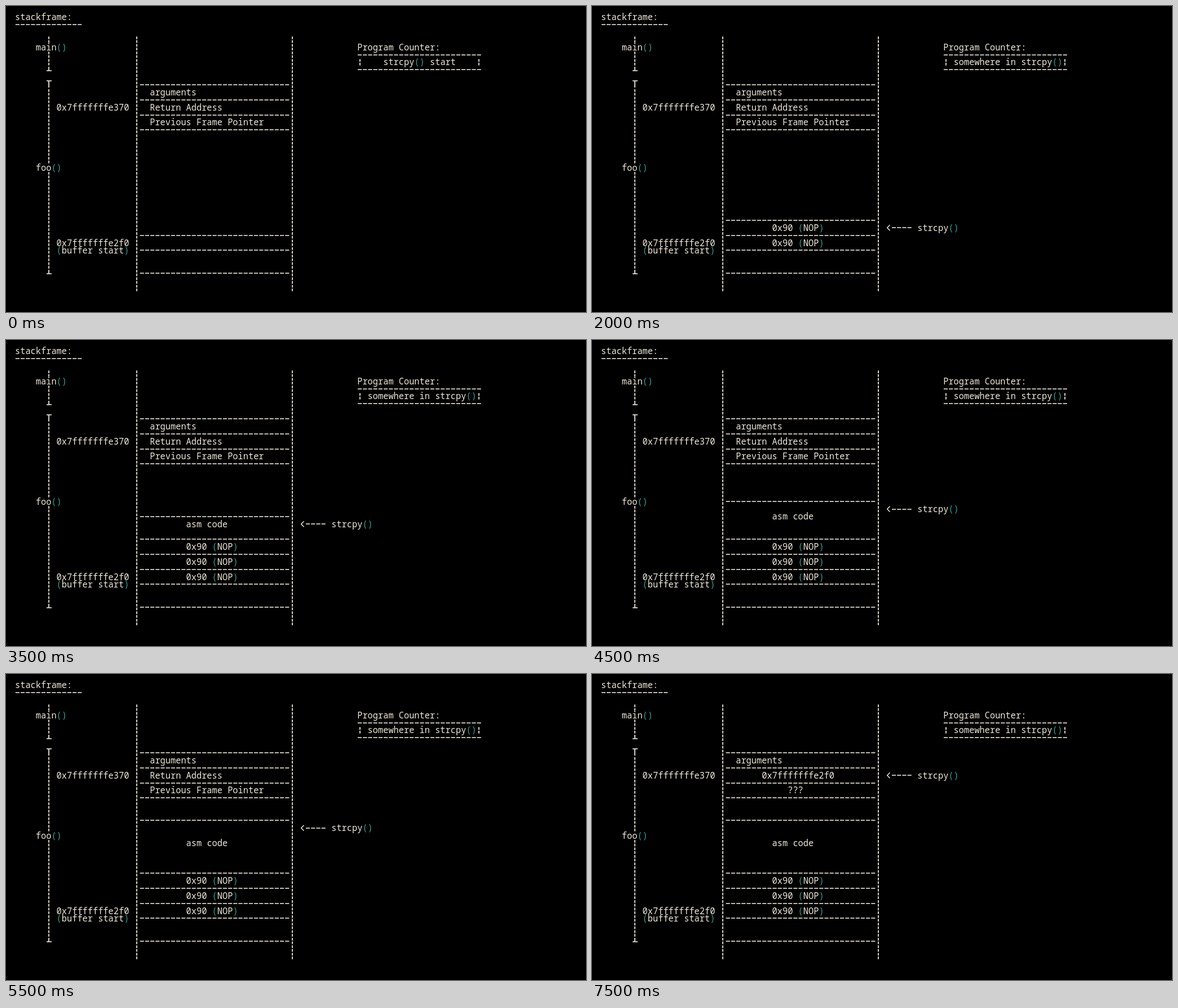
An HTML page with a canvas that plays this animation: 1029x544 px, repeating every 8 s.

```html
<!DOCTYPE html>
<html lang="en">
<head>
<meta charset="utf-8">
<title>Stack frame</title>
<style>
  html, body { margin: 0; width: 100%; height: 100%; overflow: hidden; background: #000; }
  canvas { display: block; width: 1029px; height: 544px; }
</style>
</head>
<body>
<canvas id="stage" width="1029" height="544"></canvas>
<script>
const ctx = document.getElementById('stage').getContext('2d');
const LOOP = 8000, FIRST_STEP = 1500, STEP = 500;
const CELL = 9.2, PITCH = 13.38, LEFT = 16, TOP = 19.6;
const INK = '#eee8d5', TEAL = '#2aa198';

const colX = col => LEFT + col * CELL;
const rowY = row => TOP + row * PITCH;

function text(col, row, str) {
  for (const part of str.split(/([()])/)) {
    ctx.fillStyle = /[()]/.test(part) ? TEAL : INK;
    ctx.fillText(part, colX(col), rowY(row) + 5.5);
    col += part.length;
  }
}

function dashes(col, row, count) {
  ctx.fillStyle = INK;
  for (let i = 0; i < count; i++) {
    ctx.fillRect(colX(col + i) + 0.8, Math.round(rowY(row)) - 0.8, 7.2, 1.6);
  }
}

function bars(col, from, to) {
  ctx.fillStyle = INK;
  const x = Math.round(colX(col) + 4.6) - 0.9;
  for (let row = from; row <= to; row++) {
    ctx.fillRect(x, rowY(row) - 5.5, 1.8, 4.8);
    ctx.fillRect(x, rowY(row) + 1, 1.8, 4.8);
  }
}

// Bracket end: a short horizontal stroke with a stem leading to the line.
function cap(y, stem) {
  ctx.fillStyle = INK;
  ctx.fillRect(72, y - 0.8, 9, 1.6);
  ctx.fillRect(75.1, Math.min(y, y + stem), 1.8, Math.abs(stem));
}

const rule = row => dashes(24, row, 29);

function arrow(row) {
  const x = colX(55), y = rowY(row);
  ctx.strokeStyle = INK;
  ctx.lineWidth = 1.5;
  ctx.beginPath();
  ctx.moveTo(x + 6.5, y - 5);
  ctx.lineTo(x + 1.8, y);
  ctx.lineTo(x + 6.5, y + 5);
  ctx.stroke();
  dashes(56, row, 4);
  text(61, row, 'strcpy()');
}

function layout() {
  text(0, 0, 'stackframe:');
  dashes(0, 1, 13);

  bars(6, 3, 3);
  text(4, 4, 'main()');
  bars(6, 5, 6);
  cap(115, -7);
  cap(133, 12);
  bars(6, 10, 19);
  text(4, 20, 'foo()');
  bars(6, 21, 33);
  cap(476, -7);

  text(8, 12, '0x7fffffffe370');
  text(8, 30, '0x7fffffffe2f0');
  text(8, 31, '(buffer start)');

  bars(23, 3, 36);
  bars(53, 3, 36);
  [9, 11, 13, 15, 29, 31, 34].forEach(rule);
  text(26, 10, 'arguments');

  text(66, 4, 'Program Counter:');
  dashes(66, 5, 24);
  bars(66, 6, 6);
  bars(89, 6, 6);
  dashes(66, 7, 24);
}

// Row the copy has reached at each step, from the buffer start upwards.
const COPY_ROWS = [30, 28, 26, 24, 23, 22, 21, 20, 19, 17, 16, 14, 12];

function copyState(step) {
  if (step < 0) text(71, 6, 'strcpy() start');
  else {
    text(68, 6, 'somewhere in strcpy()');
    arrow(COPY_ROWS[step]);
  }

  for (let i = 0; i <= Math.min(step, 2); i++) {
    text(33, 30 - 2 * i, '0x90 (NOP)');
    if (i) rule(29 - 2 * i);
  }

  if (step >= 3) {
    const grown = Math.min(step, 8) - 3;
    rule(23 - grown);
    text(33, 24 - Math.ceil(grown / 2), 'asm code');
  }

  if (step < 11) text(26, 14, 'Previous Frame Pointer');
  else text(36, 14, '???');
  if (step < 12) text(26, 12, 'Return Address');
  else text(31, 12, '0x7fffffffe2f0');
}

function draw(ms) {
  const step = Math.floor((ms - FIRST_STEP) / STEP);
  ctx.fillStyle = '#000';
  ctx.fillRect(0, 0, 1029, 544);
  ctx.font = '500 15.333px "Noto Sans Mono", "DejaVu Sans Mono", monospace';
  layout();
  copyState(ms < FIRST_STEP ? -1 : step);
}

const start = performance.now();
function tick() {
  draw((performance.now() - start) % LOOP);
  requestAnimationFrame(tick);
}
tick();
</script>
</body>
</html>
```
